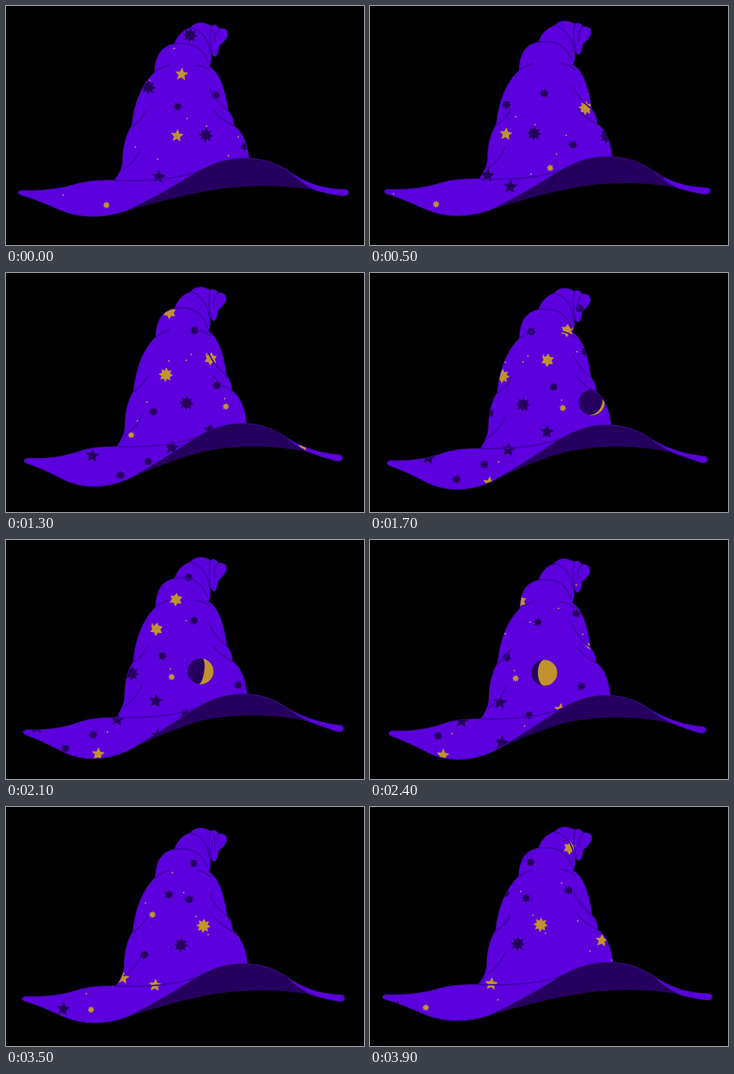
Animation of 634 by 424 pixels, one loop 4 s. Source, as an HTML page with a canvas:

```html
<!DOCTYPE html>
<html lang="en">
<head>
<meta charset="utf-8">
<title>Wizard hat</title>
<style>
html, body { margin: 0; width: 100%; height: 100%; overflow: hidden; background: #000; }
canvas { display: block; filter: blur(.5px); }
</style>
</head>
<body>
<canvas id="stage" width="634" height="424"></canvas>
<script>
const ctx = document.getElementById('stage').getContext('2d');
const LOOP = 4000, STEP = 100, TAU = 2 * Math.PI;
const PURPLE = '#5c00de', DARK = '#26005e', GOLD = '#c2922f', DOT = '#c88a55', EDGE = '#3a0d94', FOLD = '#4200ab';

// Quadratic arcs: control point, end point
const CROWN = [
  [204, 294, 206, 278], [206, 238, 222, 214], [228, 152, 263, 118], [264, 74, 298, 68],
  [306, 46, 327, 39], [340, 24, 364, 36], [372, 31, 378, 41], [394, 39, 393, 53],
  [390, 62, 378, 71], [376, 89, 370, 90], [366, 88, 362, 81], [366, 98, 360, 108],
  [385, 122, 394, 187], [404, 198, 404, 213], [426, 228, 431, 271]
];
const RIM = [[472, 273, 505, 296], [548, 326, 601, 326], [609, 327, 608, 333], [606, 339, 595, 337], [570, 334, 548, 327]];
const FRONT_EDGE = [[520, 313, 505, 296], [472, 273, 431, 271], [380, 267, 325, 303], [270, 337, 212, 364]];
const BRIM = [[150, 385, 95, 363], [50, 343, 24, 336], [15, 331, 26, 328], [80, 330, 125, 316], [150, 309, 191, 310]];
const UNDERSIDE = [[285, 343, 350, 330], [450, 311, 548, 327]];
// Start, control, end
const FOLDS = [
  [191, 310, 290, 314, 343, 293], [238, 254, 230, 276, 206, 292], [222, 215, 238, 206, 248, 187],
  [263, 118, 274, 110, 288, 106], [338, 106, 354, 108, 364, 117], [361, 147, 370, 168, 394, 187],
  [369, 187, 382, 203, 405, 214], [298, 68, 346, 62, 358, 101], [327, 39, 356, 46, 362, 82],
  [364, 36, 358, 60, 366, 84], [378, 41, 368, 50, 371, 66]
];

// Star field, wider than the hat; it slides left behind the outline
const STARS = [
  { color: DARK, r: 13, points: 8, at: [[326, 53], [252, 145], [354, 230], [485, 235], [747, 238]] },
  { color: DARK, r: 8.5, points: 8, at: [
    [304, 179], [372, 159], [424, 250], [500, 107], [589, 66], [541, 204], [363, 357], [414, 336],
    [599, 142], [670, 127], [680, 255], [583, 305], [725, 148], [762, 157], [770, 93], [838, 143]] },
  { color: DARK, r: 13, points: 5, at: [[270, 304], [311, 324], [529, 283], [458, 313], [532, 350]] },
  { color: GOLD, r: 13, points: 8, at: [[447, 185], [788, 204]] },
  { color: GOLD, r: 6.5, points: 8, at: [[177, 354], [383, 291], [558, 241], [695, 184], [583, 351]] },
  { color: GOLD, r: 12, points: 5, at: [[311, 122], [303, 231], [641, 296], [423, 366], [702, 66], [700, 309], [897, 232]] },
  { color: GOLD, r: 12, points: 6, at: [[454, 75], [566, 105], [840, 68], [530, 157]] }
];
const MOON = { x: 611, y: 231, r: 23 };

let seed = 7;
function random() {
  seed = (seed * 16807) % 2147483647;
  return seed / 2147483647;
}
const DOTS = Array.from({ length: 36 }, (_, i) => [100 + 23 * i + 20 * random(), 60 + 300 * random()]);

const clamp = v => Math.min(1, Math.max(0, v));
let pose;

function setPose(t) {
  const u = t / LOOP, w = TAU * u, sin = Math.sin(w), cos = Math.cos(w), s = t / 1000 - 1.7;
  pose = {
    width: .966 + .014 * (cos + Math.cos(2 * w)) + .007 * sin,
    bob: 5 * u - 5 * sin - .8,
    flex: 1 - cos,
    scroll: 498 * u + 4 * Math.sin(Math.PI * u),
    phase: .64 + .97 * s + 1.57 * s * s
  };
}

// The hat bobs as a whole; the left brim sags, the underside lifts
function warp(x, y) {
  const sag = 6.5 * clamp((y - 290) / 84) * clamp((320 - x) / 170);
  const rim = Math.max(271, 364 - .47 * (x - 212), 271 + .4 * (x - 431));
  const lift = 6.5 * clamp((y - rim) / 18);
  const tip = 1.5 * clamp(1 - y / 300);
  return [314 + (x - 314) * pose.width, y + pose.bob + pose.flex * (sag - lift - tip)];
}

function shape(x, y, ...runs) {
  const path = new Path2D();
  path.moveTo(...warp(x, y));
  for (const [cx, cy, ex, ey] of runs.flat()) path.quadraticCurveTo(...warp(cx, cy), ...warp(ex, ey));
  return path;
}

function star(x, y, r, n) {
  const inner = n === 5 ? .47 : .6;
  ctx.beginPath();
  for (let i = 0; i < 2 * n; i++) {
    const a = Math.PI * (i / n - .5) + .1, q = i % 2 ? r * inner : r;
    ctx.lineTo(x + q * Math.cos(a), y + q * Math.sin(a));
  }
  ctx.fill();
}

function disc(x, y, r) {
  ctx.beginPath();
  ctx.arc(x, y, r, 0, TAU);
  ctx.fill();
}

const drift = ([x, y]) => warp(x - pose.scroll, y);

function moon() {
  const [x, y] = drift([MOON.x, MOON.y]), r = MOON.r, c = Math.cos(pose.phase);
  ctx.fillStyle = DARK;
  disc(x, y, r);
  ctx.save();
  ctx.translate(x, y);
  ctx.rotate(.5 * Math.max(0, c));
  ctx.scale(pose.phase < Math.PI ? 1 : -1, 1);
  ctx.fillStyle = GOLD;
  ctx.beginPath();
  ctx.arc(0, 0, r, -TAU / 4, TAU / 4);
  ctx.ellipse(0, 0, Math.abs(c) * r, r, 0, TAU / 4, -TAU / 4, c > 0);
  ctx.fill();
  ctx.restore();
}

function render(t) {
  setPose(t);
  ctx.fillStyle = '#000';
  ctx.fillRect(0, 0, 634, 424);
  ctx.lineJoin = ctx.lineCap = 'round';

  const front = shape(191, 310, CROWN, RIM, FRONT_EDGE, BRIM);
  ctx.fillStyle = DARK;
  ctx.fill(shape(212, 364, UNDERSIDE, FRONT_EDGE));
  ctx.fillStyle = PURPLE;
  ctx.fill(front);

  ctx.save();
  ctx.clip(front);
  for (const { color, r, points, at } of STARS) {
    ctx.fillStyle = color;
    for (const p of at) star(...drift(p), r, points);
  }
  ctx.fillStyle = DOT;
  for (const p of DOTS) disc(...drift(p), 1.4);
  moon();
  ctx.strokeStyle = FOLD;
  ctx.lineWidth = 2.5;
  for (const [x, y, ...arc] of FOLDS) ctx.stroke(shape(x, y, [arc]));
  ctx.restore();

  ctx.strokeStyle = EDGE;
  ctx.lineWidth = 1.2;
  ctx.stroke(front);
}

function tick() {
  render(Math.floor(performance.now() % LOOP / STEP) * STEP);
  requestAnimationFrame(tick);
}
tick();
</script>
</body>
</html>
```
